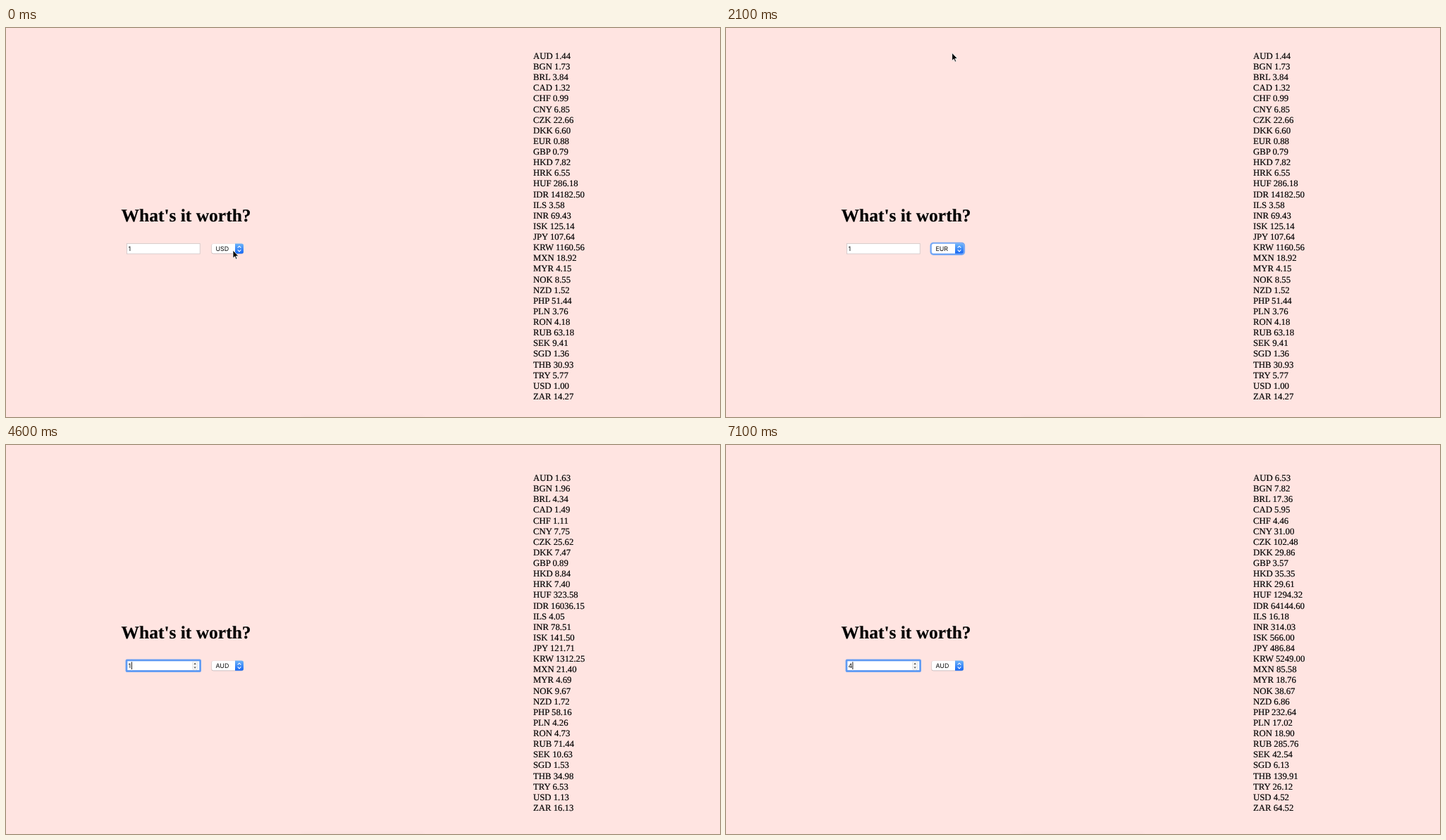
Animation of 1013x553 px, one loop 7.2 s. Source, as an HTML page:

```html
<!DOCTYPE html>
<html lang="en">
<head>
<meta charset="utf-8">
<title>What's it worth?</title>
<style>
  html, body { margin: 0; width: 100%; height: 100%; overflow: hidden; background: #ffe4e1; }
  svg { display: block; width: 1013px; height: 553px; text-rendering: geometricPrecision; }
  /* The tiny turn keeps baselines from snapping to whole pixels */
  text { transform-box: fill-box; transform: rotate(.02deg); }
  .serif { font: 12.74px "Liberation Serif", "Times New Roman", serif; stroke: #000; stroke-width: .18; }
  .title { font-size: 25.48px; font-weight: bold; }
  .ui { font: 8.9px Inter, "Liberation Sans", sans-serif; fill: #0c0c0c; }
  .item { fill: #3b3839; }
  .item.on { fill: #fff; font-weight: 700; }
  .ring { fill: #8bb5f8; stroke: #6ea3f4; stroke-width: 1.4; }
  .field { fill: #fff; stroke: #cfc5c5; stroke-width: .8; }
  .field.focus { stroke: #5b97f2; stroke-width: 1.8; }
  .line { fill: none; stroke-linecap: round; stroke-linejoin: round; }
</style>
</head>
<body>
<svg viewBox="0 0 1013 553">
  <defs>
    <linearGradient id="blue" x2="0" y2="1">
      <stop stop-color="#6cb3fa"/><stop offset="1" stop-color="#1767f3"/>
    </linearGradient>
    <linearGradient id="glass" gradientUnits="userSpaceOnUse" x1="0" x2="0" y1="0" y2="336">
      <stop stop-color="#f5ebea"/><stop offset=".68" stop-color="#f3e8e8"/>
      <stop offset=".79" stop-color="#eee4e6"/><stop offset=".92" stop-color="#e9e6ee"/>
      <stop offset="1" stop-color="#ece7ec"/>
    </linearGradient>
    <filter id="soft" x="-30%" y="-10%" width="160%" height="120%"><feGaussianBlur stdDeviation="3"/></filter>
    <filter id="haze" x="-20%" y="-300%" width="140%" height="700%"><feGaussianBlur stdDeviation="3"/></filter>
  </defs>
  <rect width="1013" height="553" fill="#ffe4e1"/>
  <rect x="418" y="554" width="174" height="8" fill="#765" opacity=".07" filter="url(#haze)"/>
  <text class="serif title" x="163.6" y="274.7">What's it worth?</text>
  <g id="list" class="serif"></g>

  <rect id="inputRing" class="ring" x="170.2" y="305.2" width="106.1" height="17" rx="1.5"/>
  <rect id="field" class="field" x="171.4" y="306.4" width="103.8" height="14.6"/>
  <g id="spinner">
    <rect x="264.7" y="307.6" width="6.8" height="12.2" rx="2" fill="#f8f8f8" stroke="#d2d2d2" stroke-width=".6"/>
    <path d="M266.4 312L268.1 309.6 269.8 312ZM266.4 315.4L268.1 317.8 269.8 315.4Z" fill="#555"/>
  </g>
  <text id="amount" class="ui" x="173.6" y="317.1"></text>
  <rect id="caret" y="308.4" width=".9" height="10.6"/>

  <rect id="selectRing" class="ring" x="290.2" y="305.4" width="48.2" height="16.8" rx="4"/>
  <rect id="selectEdge" x="291.4" y="306.8" width="45.6" height="14.4" rx="3" fill="#a99da0" opacity=".75"/>
  <rect x="291.8" y="306.7" width="44.8" height="13.9" rx="2.8" fill="#fff"/>
  <path d="M325 306.6h9.2a2.8 2.8 0 0 1 2.8 2.8v8.6a2.8 2.8 0 0 1-2.8 2.8H325Z" fill="url(#blue)"/>
  <path class="line" d="M329 312.2l2-2.2 2 2.2M329 315.6l2 2.2 2-2.2" stroke="#fff" stroke-width="1.1"/>
  <text id="choice" class="ui" x="297.4" y="317.1"></text>

  <g id="menu">
    <rect x="282" y="-20" width="55.5" height="358" rx="4" fill="#000" opacity=".28" filter="url(#soft)"/>
    <rect x="282.4" y="-20" width="54.6" height="356" rx="4" fill="url(#glass)" stroke="#b9aeb0" stroke-width=".7"/>
    <rect id="mark" x="282.6" width="54.2" height="12.76" fill="#348af5"/>
    <g id="items"></g>
    <path id="check" class="line" d="M287.6 314.6l2.2 2.8 3.9-6.6" stroke="#333" stroke-width="1.1"/>
  </g>
  <path id="arrow" d="M0 0V11.2L2.6 8.8 4.3 12.8 6 12.1 4.3 8.2H7.8Z" stroke="#fff" stroke-width=".8"/>
  <path id="beam" class="line" d="M-1.8 -5.5Q0 -5.5 0 -4V4Q0 5.5 -1.8 5.5M1.8 -5.5Q0 -5.5 0 -4M0 4Q0 5.5 1.8 5.5" stroke="#222" stroke-width=".8"/>
</svg>
<script>
const LOOP = 7200, STEP = 100;
const LINE = 15.125, ROW = 12.76, MENU_END = 333.4;

// Units of each currency per euro
const rates = `AUD 1.6325 BGN 1.95575 BRL 4.34 CAD 1.4875 CHF 1.11425 CNY 7.75
  CZK 25.62 DKK 7.46575 EUR 1 GBP 0.8925 HKD 8.8375 HRK 7.4025 HUF 323.58
  IDR 16036.15 ILS 4.0455 INR 78.5075 ISK 141.5 JPY 121.71 KRW 1312.25
  MXN 21.3955 MYR 4.69 NOK 9.6675 NZD 1.7155 PHP 58.16 PLN 4.2555 RON 4.7255
  RUB 71.44 SEK 10.6345 SGD 1.5325 THB 34.9775 TRY 6.5295 USD 1.1307 ZAR 16.13`
  .match(/[A-Z]{3} [\d.]+/g)
  .map(s => [s.slice(0, 3), +s.slice(4)]);
const usd = rates.find(r => r[0] === 'USD')[1];

// Pointer stops: time, x, y
const path = [
  [0, 322, 316], [100, 320, 309], [700, 320, 309], [800, 321, 233], [900, 322, 178],
  [1000, 323, 130], [1200, 325, 66], [1400, 326, 25], [1500, 326, 18], [2000, 326, 18],
  [2300, 310, 70], [2400, 298, 112], [2600, 253, 232], [2800, 223, 297], [3000, 222, 313]
];
const amounts = [[0, 1], [4700, 2], [5300, 3], [5800, 4]];
const blinks = [[0, false], [3400, true], [3900, false], [4400, true], [5200, false],
  [5300, true], [6300, false], [6800, true]];

const $ = id => document.getElementById(id);
const at = (steps, t) => steps.filter(s => s[0] <= t).pop()[1];
const show = (id, on) => $(id).setAttribute('visibility', on ? 'inherit' : 'hidden');

function move(id, x, y) {
  $(id).setAttribute('transform', `translate(${x} ${y})`);
}

function addText(parent, x, y, cls = '') {
  const el = document.createElementNS('http://www.w3.org/2000/svg', 'text');
  el.setAttribute('x', x);
  el.setAttribute('y', y);
  el.setAttribute('class', cls);
  parent.append(el);
  return el;
}

function pointer(t) {
  const i = path.findIndex(p => p[0] > t);
  if (i < 0) return path.at(-1).slice(1);
  const [t0, x0, y0] = path[Math.max(0, i - 1)], [t1, x1, y1] = path[i];
  const k = Math.max(0, (t - t0) / (t1 - t0));
  return [x0 + (x1 - x0) * k, y0 + (y1 - y0) * k];
}

const rowTop = i => MENU_END - (rates.length - i) * ROW;
const lines = rates.map((_, i) => addText($('list'), 748, 43.95 + i * LINE));
const items = rates.map(([code], i) => {
  const el = addText($('items'), 299, rowTop(i) + 9.6, 'ui item');
  el.textContent = code;
  return el;
});

function fillList(euro, amount) {
  const shown = rates.filter(r => !euro || r[0] !== 'EUR');
  lines.forEach((el, i) => {
    const r = shown[i];
    el.textContent = r ? `${r[0]} ${(r[1] * amount / (euro ? 1 : usd)).toFixed(2)}` : '';
  });
  move('list', 0, euro ? 7.16 : 0);
}

let lastKey;
function draw(t) {
  const amount = at(amounts, t), euro = t >= 2200, focus = t >= 3400;
  const open = t >= 300 && t < 2000, picking = t >= 300 && !focus;
  const key = euro + ':' + amount;
  if (key !== lastKey) fillList(euro, amount);
  lastKey = key;

  $('amount').textContent = amount;
  $('choice').textContent = euro ? 'AUD' : t >= 2000 ? 'EUR' : 'USD';
  $('field').classList.toggle('focus', focus);
  show('inputRing', focus);
  show('spinner', focus);
  show('selectRing', picking);
  $('selectEdge').setAttribute('fill', picking ? '#5b97f2' : '#a99da0');
  show('caret', at(blinks, t));
  $('caret').setAttribute('x', amount === 1 ? 177.9 : 179.4);

  show('menu', open);
  if (open) {
    // The highlight trails the pointer slightly
    const y = pointer(t - 50)[1];
    const hot = Math.floor((y - rowTop(0)) / ROW);
    $('mark').setAttribute('y', rowTop(hot));
    items.forEach((el, i) => el.classList.toggle('on', i === hot));
    $('check').setAttribute('stroke', rates[hot][0] === 'USD' ? '#fff' : '#333');
  }

  const [x, y] = pointer(t), inField = t >= 3000;
  show('arrow', !inField);
  show('beam', inField && t < 4400);
  move('arrow', x, y);
  move('beam', x, y);
}

const start = performance.now();
function tick() {
  const t = (performance.now() - start) % LOOP;
  draw(Math.floor(t / STEP) * STEP);
  requestAnimationFrame(tick);
}
tick();
</script>
</body>
</html>
```
